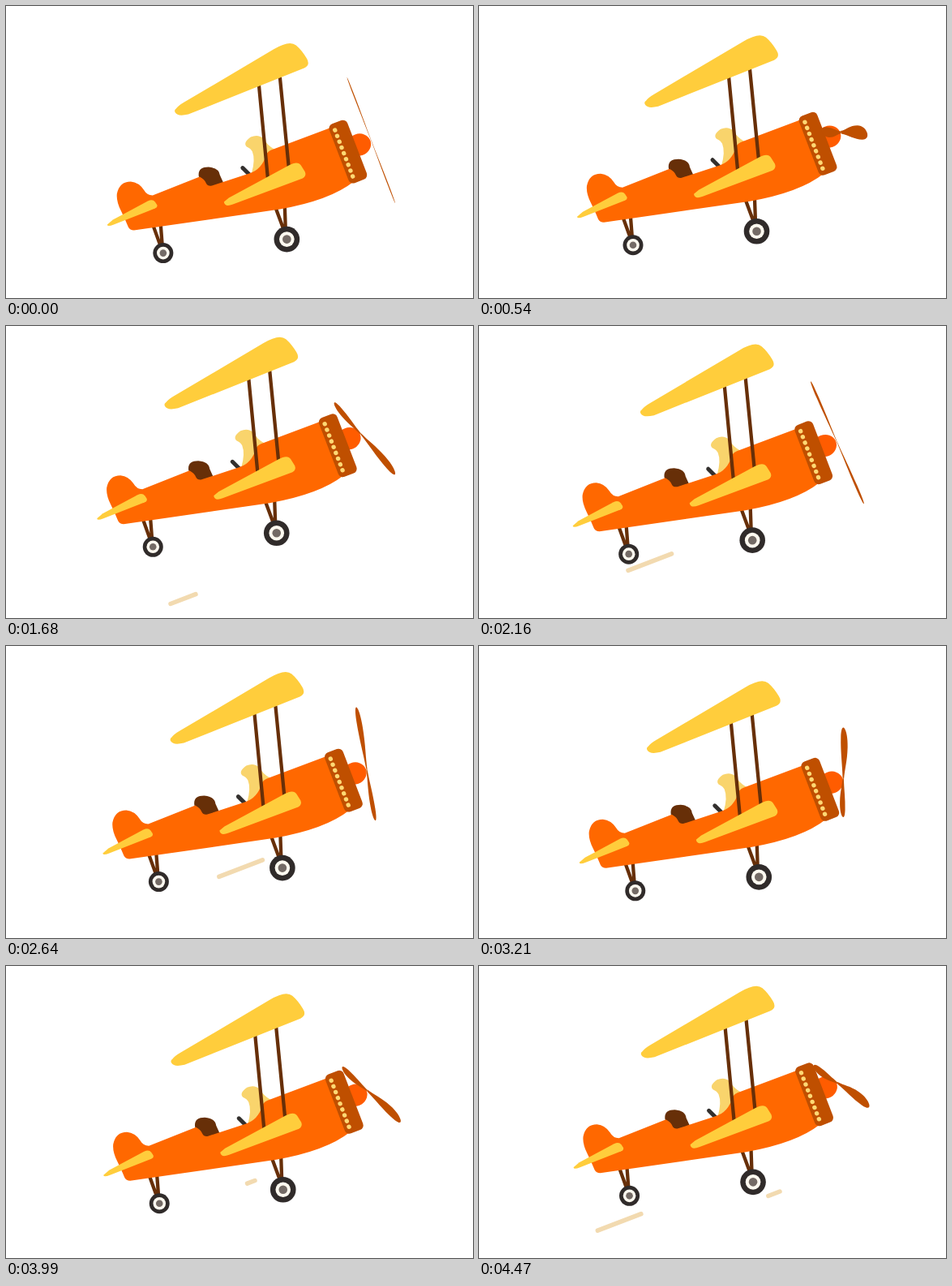
These frames come from a looping animation (576x360 px, 4500 ms). An HTML page:

```html
<!DOCTYPE html>
<html lang="en">
<head>
<meta charset="utf-8">
<title>Biplane</title>
<style>
  html, body { margin: 0; width: 100%; height: 100%; overflow: hidden; background: #fff; }
  svg { display: block; width: 100vw; height: 100vh; }
  .strut { fill: none; stroke: #672f08; stroke-width: 4.3; }
  .wing { fill: #ffcd3c; }
  .trim { fill: #bf4f00; }
</style>
</head>
<body>
<svg viewBox="0 0 576 360">
  <g id="dashes" stroke="#f2dab0" stroke-width="5.500" stroke-linecap="round"></g>
  <g id="plane">
    <path class="strut" d="M182 272L191 297M191 271L193 297M333 250L343 277M344 248L345 277"/>
    <g id="wheels"></g>
    <path fill="#672f08" d="M238 211Q236 199 250 199Q263 200 264 209L269 220L250 224Z"/>
    <path stroke="#33302e" stroke-width="5" stroke-linecap="round" d="M292 200L300 208"/>
    <path fill="#f9d46c" d="M297 174Q292 169 302 162Q311 158 318 164Q322 172 331 177L328 190L303 207Q308 190 304 180Q302 176 297 174Z"/>
    <path fill="#ff6800" d="M151 273Q147 263 142 253Q136 241 137 232Q140 217 154 217Q164 218 170 227Q174 234 181 234L239 211Q245 214 247 219Q249 223 254 222L300 207Q316 202 321 184Q323 179 330 177L402 150L429 217Q400 240 338 251L158 277Q153 277 151 273Z"/>
    <ellipse fill="#ff5c00" cx="435.500" cy="171.500" rx="15" ry="13.500" transform="rotate(-21 435.500 171.500)"/>
    <g transform="translate(422 180) rotate(-21)">
      <rect class="trim" x="-12" y="-39" width="24" height="78" rx="6"/>
      <path stroke="#ffd873" stroke-width="5.400" stroke-linecap="round" stroke-dasharray="0 7.630" d="M-5.500 -30.500V31.500"/>
    </g>
    <path class="strut" d="M312 97L323 212M338 88L349 200"/>
    <path class="wing" d="M210 127Q213 123 220 119L330 54Q350 42 358 49Q365 55 371 65Q376 73 368 77L225 134Q212 137 209 132Q207 129 210 127Z"/>
    <path class="wing" d="M269 242L275 237L349 197Q360 191 364 197L369 205Q371 210 366 213L280 245Q270 249 269 242Z"/>
    <path class="wing" d="M125 270L132 264L175 241Q181 238 184 242L186 245Q188 248 184 250L133 270Q125 273 125 270Z"/>
    <g id="propeller" class="trim">
      <path id="near" d="M0 -1.500C20 -3 36 -8 60 -8C76 -8 83 -4 83 0C83 4 76 8 60 8C36 8 20 3 0 1.500Z"/>
      <path id="far"/>
    </g>
  </g>
</svg>
<script>
const LOOP = 4500, CYCLE = 3350, STEP = 30;
const $ = id => document.getElementById(id);
const clamp = (v, lo, hi) => Math.min(hi, Math.max(lo, v));

function add(parent, name, attrs) {
  const el = document.createElementNS("http://www.w3.org/2000/svg", name);
  for (const key in attrs) el.setAttribute(key, attrs[key]);
  return parent.appendChild(el);
}

function wheel(cx, cy, ...radii) {
  ["#302b2a", "#fffaf0", "#746b66"].forEach((fill, i) => add($("wheels"), "circle", { cx, cy, r: radii[i], fill }));
}
wheel(194, 305, 12.5, 7.8, 4.3);
wheel(346.5, 288, 15.8, 9.3, 5.3);

// Speed streaks: birth time and starting point
const streaks = [[70, 300, 330], [610, 307, 264.5], [1075, 371, 278], [1760, 310, 253], [2430, 329, 259]]
  .map(([birth, x, y]) => ({ birth, x, y, el: add($("dashes"), "line", {}) }));

function drawStreak({ birth, x, y, el }, t) {
  const travel = age => clamp(age * 0.315, 0, 168);
  const head = travel(t - birth), tail = travel(t - birth - 170);
  el.style.display = head > tail ? "" : "none";
  [["1", head], ["2", tail]].forEach(([n, d]) => {
    el.setAttribute("x" + n, x - d);
    el.setAttribute("y" + n, y + d * 0.384);
  });
}

// Propeller angle in degrees over one cycle
const spin = [[0, 0], [540, 983], [640, 1139], [1120, 2046], [1680, 3110], [2640, 4826], [3210, 5887], [CYCLE, 6120]];

function spinAt(t) {
  const i = spin.findIndex(([time]) => time > t);
  const [t0, a0] = spin[i - 1], [t1, a1] = spin[i];
  return (a0 + (a1 - a0) * (t - t0) / (t1 - t0)) * Math.PI / 180;
}

// The disc is seen almost edge-on: squash it along the plane's axis and enlarge the nearer blade
$("far").setAttribute("d", $("near").getAttribute("d"));

function drawPropeller(t) {
  const a = spinAt(t), c = Math.cos(a), s = Math.sin(a), squash = 0.313, depth = 0.16;
  const thin = Math.min(1, 0.25 + 2 * Math.abs(s));
  const m = [squash * s, c, squash * c * thin, -s * thin, 0, 0];
  $("propeller").setAttribute("transform", `translate(450.500 166) rotate(-21) matrix(${m.map(v => v.toFixed(4))})`);
  $("near").setAttribute("transform", `scale(${1 + depth * s})`);
  $("far").setAttribute("transform", `scale(${depth * s - 1})`);
}

function draw() {
  const now = performance.now() % LOOP;
  const t = Math.floor(now / STEP) * STEP % CYCLE;
  const lift = 33 * (1 - Math.abs(1 - 2 * Math.abs(t - 20) / CYCLE));
  $("plane").setAttribute("transform", `translate(${-lift * 0.39} ${-lift})`);
  drawPropeller(t);
  streaks.forEach(streak => drawStreak(streak, t));
  requestAnimationFrame(draw);
}
draw();
</script>
</body>
</html>
```
